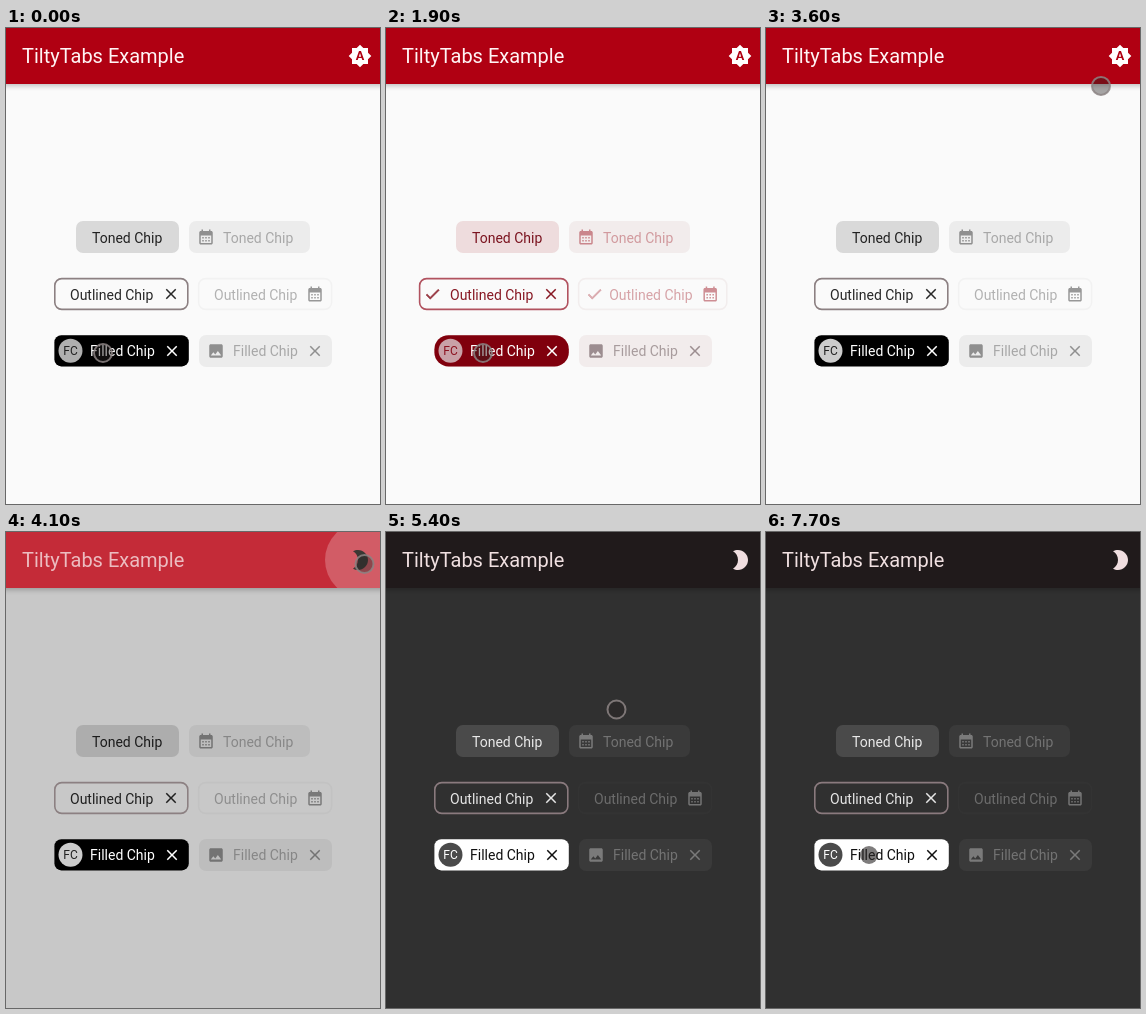
These frames come from a looping animation (374 px wide and 476 px high, 8 s). An HTML page with a canvas:

```html
<!DOCTYPE html>
<html lang="en">
<head>
<meta charset="utf-8">
<title>Chip demo</title>
<style>
  html, body { margin: 0; width: 100%; height: 100%; overflow: hidden; background: #fafafa; }
  canvas { display: block; width: 374px; height: 476px; }
</style>
</head>
<body>
<canvas id="stage"></canvas>
<script>
const WIDTH = 374, HEIGHT = 476, LOOP = 8000, STEP = 100;
const canvas = document.getElementById('stage');
const ctx = canvas.getContext('2d');
const ratio = window.devicePixelRatio || 1;
canvas.width = WIDTH * ratio;
canvas.height = HEIGHT * ratio;

const icons = {
  close: 'M19 6.41L17.59 5 12 10.59 6.41 5 5 6.41 10.59 12 5 17.59 6.41 19 12 13.41 17.59 19 19 17.59 13.41 12z',
  check: 'M9 16.17L4.83 12l-1.42 1.41L9 19 21 7l-1.41-1.41z',
  image: 'M21 19V5c0-1.1-.9-2-2-2H5c-1.1 0-2 .9-2 2v14c0 1.1.9 2 2 2h14c1.1 0 2-.9 2-2zM8.5 13.5l2.5 3.01L14.5 12l4.5 6H5l3.5-4.5z',
  calendar: 'M19 4h-1V2h-2v2H8V2H6v2H5c-1.1 0-2 .9-2 2v14c0 1.1.9 2 2 2h14c1.1 0 2-.9 2-2V6c0-1.1-.9-2-2-2zm0 16H5V10h14z' +
    'M7 12h2v2H7zM11 12h2v2h-2zM15 12h2v2h-2zM7 16h2v2H7zM11 16h2v2h-2zM15 16h2v2h-2z',
  auto: 'M10.85 12.65h2.3L12 9zM20 8.69V4h-4.69L12 .69 8.69 4H4v4.69L.69 12 4 15.31V20h4.69L12 23.31 15.31 20H20v-4.69L23.31 12zM14.3 16l-.7-2h-3.2l-.7 2H7.8L11 7h2l3.2 9z',
  moon: 'M10 2c-1.82 0-3.53.5-5 1.35C7.99 5.08 10 8.3 10 12s-2.01 6.92-5 8.65C6.47 21.5 8.18 22 10 22c5.52 0 10-4.48 10-10S15.52 2 10 2z'
};
for (const name in icons) icons[name] = new Path2D(icons[name]);

// Each entry: light off, light on, dark off, dark on.
const palette = {
  toned: ['#00000022', '#b000121e', '#ffffff20', '#b0001226'],
  tonedText: ['#000000d8', '#8e1020ff', '#ffffffe0', '#ecb8baff'],
  outline: ['#8c8082ff', '#b84a58ff', '#8a7a7eff', '#d8a09eff'],
  outlineText: ['#000000d8', '#9c1524ff', '#ffffffe0', '#e6b6b6ff'],
  filled: ['#000000ff', '#b00012ff', '#ffffffff', '#b00014ff'],
  filledText: ['#ffffffff', '#ffffffff', '#101010ff', '#faeaeaff'],
  avatar: ['#ccccccff', '#f0b8c0ff', '#4a4a4aff', '#f0a8b0ff'],
  avatarText: ['#222222ff', '#a01020ff', '#ffffffff', '#a01020ff'],
  offFill: ['#0000000e', '#8000120e', '#ffffff0c', '#b0001210'],
  offEdge: ['#00000008', '#8000120e', '#ffffff04', '#ffb0b008'],
  offText: ['#0000004a', '#b000125c', '#ffffff4a', '#ffb0b058'],
  offIcon: ['#00000064', '#b0001270', '#ffffff54', '#ffb0b05c'],
  offFilledText: ['#0000004a', '#2000085a', '#ffffff4a', '#ffdede5c'],
  offFilledIcon: ['#00000064', '#20000866', '#ffffff54', '#ffdede60']
};

const toggles = [[450, 1], [1300, 0], [1750, 1], [2250, 0], [6200, 1], [6780, 0]];
const presses = [...toggles.map(([time]) => [time - 200, time]), [3800, 4000], [7600, LOOP]];
const cursorPath = [
  [0, 97, 325], [1900, 97, 325], [2300, 98, 323], [2500, 98, 323], [2700, 208, 198],
  [3000, 208, 198], [3800, 358.5, 32], [5000, 358.5, 32], [5800, 102.5, 323], [7700, 103, 323]
];

const progress = (time, start, end) => Math.min(1, Math.max(0, (time - start) / (end - start)));
const smooth = x => x * x * (3 - 2 * x);
const lerp = (a, b, x) => a + (b - a) * x;
const parse = hex => [1, 3, 5, 7].map(i => parseInt(hex.slice(i, i + 2) || 'ff', 16));
const blend = (a, b, x) => a.map((v, i) => lerp(v, b[i], x));
const css = ([r, g, b, a]) => `rgba(${r},${g},${b},${a / 255})`;
const mix = (a, b, x) => css(blend(parse(a), parse(b), x));

function selectedAt(time) {
  let value = 0;
  for (const [start, goal] of toggles) {
    if (time >= start) value = lerp(1 - goal, goal, smooth(progress(time, start, start + 200)));
  }
  return value;
}

function cursorAt(time) {
  const next = cursorPath.findIndex(point => point[0] > time);
  if (next < 0) return cursorPath[cursorPath.length - 1].slice(1);
  const from = cursorPath[next - 1], to = cursorPath[next];
  const x = smooth(progress(time, from[0], to[0]));
  return [lerp(from[1], to[1], x), lerp(from[2], to[2], x)];
}

function circle(x, y, radius, fill) {
  ctx.beginPath();
  ctx.arc(x, y, radius, 0, Math.PI * 2);
  ctx.fillStyle = fill;
  ctx.fill();
}

function box(x, y, width, height, radius, fill, stroke) {
  ctx.beginPath();
  ctx.roundRect(x, y, width, height, radius);
  if (fill) {
    ctx.fillStyle = fill;
    ctx.fill();
  }
  if (stroke) {
    ctx.strokeStyle = stroke;
    ctx.lineWidth = 1.6;
    ctx.stroke();
  }
}

function text(label, x, baseline, color, size = 14, align = 'left') {
  ctx.font = `${size}px Roboto, sans-serif`;
  ctx.textAlign = align;
  ctx.fillStyle = color;
  ctx.fillText(label, x, baseline);
}

function icon(name, x, y, color, size = 18, alpha = 1) {
  ctx.save();
  ctx.globalAlpha = alpha;
  ctx.translate(x - size / 2, y - size / 2);
  ctx.scale(size / 24, size / 24);
  ctx.fillStyle = color;
  ctx.fill(icons[name], 'evenodd');
  if (name === 'check') {
    ctx.strokeStyle = color;
    ctx.lineWidth = 0.7;
    ctx.stroke(icons.check);
  }
  ctx.restore();
}

function drawHeader(time, theme) {
  const tint = (light, middle, dark) => theme < 0.25
    ? mix(light, middle, theme * 4)
    : mix(middle, dark, (theme - 0.25) / 0.75);
  ctx.save();
  ctx.shadowColor = 'rgba(0,0,0,.24)';
  ctx.shadowBlur = 5 * ratio;
  ctx.shadowOffsetY = 2 * ratio;
  ctx.fillStyle = tint('#b00012', '#c42b38', '#201a1b');
  ctx.fillRect(-10, -10, WIDTH + 20, 66);
  ctx.restore();

  if (time >= 3900 && time < 4300) {
    const fade = 1 - progress(time, 4100, 4300);
    ctx.save();
    ctx.beginPath();
    ctx.rect(0, 0, WIDTH, 56);
    ctx.clip();
    circle(357, 28, lerp(18, 38, progress(time, 3900, 4100)), `rgba(255,255,255,${0.23 * fade})`);
    ctx.restore();
  }
  text('TiltyTabs Example', 16, 35, tint('#fff4f5', '#ecbcc0', '#f0e0e1'), 20);
  if (time < 4000) icon('auto', 354, 28, '#fff', 24);
  else icon('moon', 354, 28, mix('#3a3834', '#f0dee0', progress(time, 4100, 4250)), 24);
}

function drawChips(time, on, dark, hovered) {
  const color = (name, shade = dark) => {
    const [lightOff, lightOn, darkOff, darkOn] = palette[name].map(parse);
    return css(blend(blend(lightOff, lightOn, on), blend(darkOff, darkOn, on), shade));
  };
  // Icons and the filled label follow the theme later than the surfaces.
  const iconShade = dark ** 6;
  const labelShade = dark ** 1.5;
  const shift = 18 * on;

  box(70, 193, 103, 32, 7, color('toned'));
  text('Toned Chip', 86, 214.5, color('tonedText'));
  box(183, 193, 121, 32, 7, color('offFill'));
  icon('calendar', 200, 209, color('offIcon', iconShade));
  text('Toned Chip', 217, 214.5, color('offText'));

  box(48.8 - shift, 250.6, 133 + shift, 30.8, 7, null, color('outline'));
  icon('check', 46.5, 266, color('outlineText'), 18, on);
  text('Outlined Chip', 64, 271.5, color('outlineText'));
  icon('close', 165, 266, color('outlineText'));
  box(192.6, 250.6, 133 + shift, 30.8, 7, null, color('offEdge'));
  icon('check', 208.5, 266, color('offText'), 18, on);
  text('Outlined Chip', 208 + shift, 271.5, color('offText'));
  icon('calendar', 309 + shift, 266, color('offIcon', iconShade));

  const radius = lerp(7, 15.5, on);
  box(48.4, 307.2, 134.4, 31.2, radius, color('filled'));
  circle(64.5, 322.8, 12, color('avatar'));
  if (hovered && dark < 0.5) box(48.4, 307.2, 134.4, 31.2, radius, 'rgba(0,0,0,.14)');
  text('FC', 64.5, 327.3, color('avatarText'), 12, 'center');
  text('Filled Chip', 84, 328.3, color('filledText', labelShade));
  icon('close', 166, 323, color('filledText', labelShade));
  box(193, 307, 133, 32, 7, color('offFill'));
  icon('image', 210, 323, color('offFilledIcon', iconShade));
  text('Filled Chip', 227, 328.3, color('offFilledText'));
  icon('close', 309, 323, color('offFilledIcon', iconShade));
}

function drawCursor(time, [x, y]) {
  const press = presses.find(([start, end]) => time >= start && time < end);
  if (press && time - press[0] >= STEP) {
    circle(x, y, 9, 'rgba(40,36,36,.6)');
    return;
  }
  circle(x, y, 9, `rgba(40,36,36,${press ? 0.75 : 0.4})`);
  ctx.strokeStyle = 'rgba(140,132,132,.85)';
  ctx.lineWidth = 2;
  ctx.stroke();
}

function draw(now) {
  const time = Math.floor((now % LOOP) / STEP) * STEP;
  const theme = progress(time, 4050, 4250);
  const dark = progress(time, 4130, 4460);
  const cursor = cursorAt(time);
  ctx.setTransform(ratio, 0, 0, ratio, 0, 0);
  ctx.fillStyle = mix('#fafafa', '#303030', theme);
  ctx.fillRect(0, 0, WIDTH, HEIGHT);
  drawHeader(time, theme);
  drawChips(time, selectedAt(time), dark, cursor[1] > 307 && cursor[0] < 183);
  drawCursor(time, cursor);
}

let origin;
function frame(now) {
  origin ??= now;
  draw(Math.max(0, now - origin));
  requestAnimationFrame(frame);
}
draw(0);
requestAnimationFrame(frame);
</script>
</body>
</html>
```
